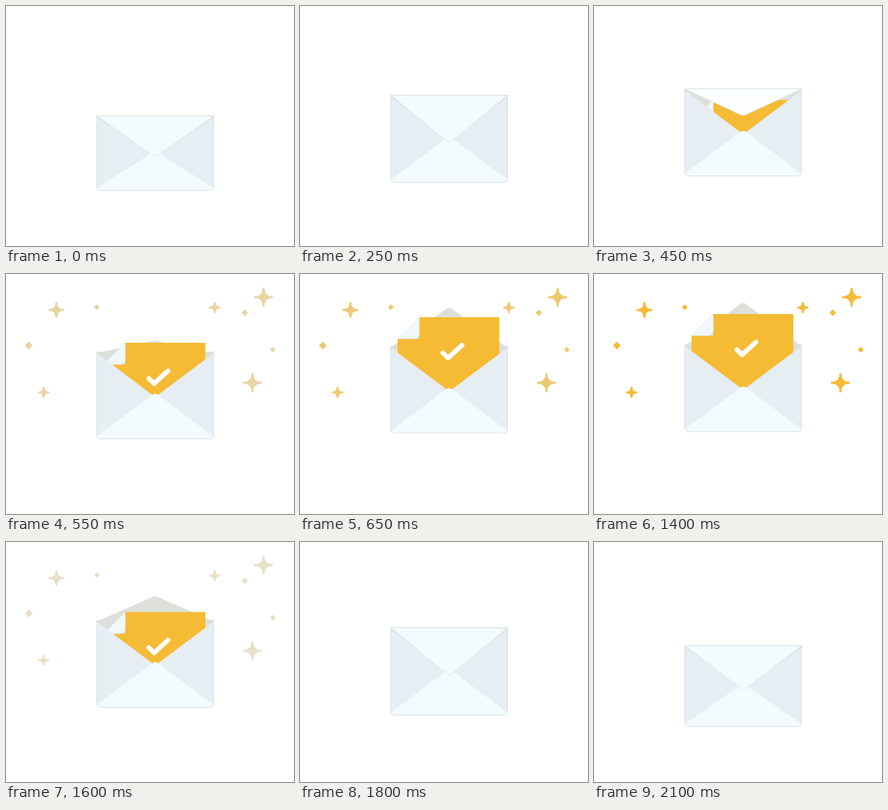
Write an HTML page with a canvas that moves like this. It is 360 px wide and 300 px high and loops after 2.2 s.

```html
<!DOCTYPE html>
<html lang="en">
<head>
<meta charset="utf-8">
<title>Envelope</title>
<style>
html, body { margin: 0; width: 100%; height: 100%; overflow: hidden; background: #fff; }
canvas { display: block; width: 360px; height: 300px; }
</style>
</head>
<body>
<canvas id="stage" width="360" height="300"></canvas>
<script>
const ctx = document.getElementById('stage').getContext('2d');
const LOOP = 2200, STEP = 50, LAST = 2100;
const L = 113.5, R = 259.5, CX = 186.5;
const GOLD = '#f5bb35', INSIDE = '#dddfdb', SIDE = '#e6edf3', PALE = '#f3fbfe', EDGE = '#d9e3e7';

// x, y, arm length
const stars = [
  [63, 45, 10], [113.5, 41.5, 3], [28.5, 89.5, 4.5], [47, 148, 7], [261, 42, 7],
  [298.5, 48.5, 3.5], [322, 29, 12], [333.5, 94.5, 3], [308, 136, 12]
];

const clamp = u => Math.max(0, Math.min(1, u));
const span = (t, a, b) => clamp((t - a) / (b - a));
const lerp = (a, b, u) => a + (b - a) * u;
const smooth = u => u * u * (3 - 2 * u);

function track(t, keys) {
  let i = 1;
  while (i < keys.length - 1 && t > keys[i][0]) i++;
  const [t0, v0] = keys[i - 1], [t1, v1] = keys[i];
  return lerp(v0, v1, span(t, t0, t1));
}

const bottomKeys = [[0, 230.5], [450, 212.5], [550, 206], [650, 199], [700, 197], [1400, 197], [2100, 230.5]];
const heightKeys = [[0, 93], [250, 109], [1900, 109], [2100, 101]];
const paperKeys = [[0, 22], [350, 22], [450, 14], [650, -36], [700, -38], [1400, -38], [1600, -10], [1800, 22]];

function poly(points, fill) {
  ctx.beginPath();
  points.forEach(([x, y]) => ctx.lineTo(x, y));
  ctx.closePath();
  ctx.fillStyle = fill;
  ctx.fill();
}

// Triangle on a horizontal base with a rounded tip
function wedge(base, tip, fill, edge) {
  ctx.beginPath();
  ctx.moveTo(L, base);
  ctx.arcTo(CX, tip + Math.sign(tip - base), R, base, 6);
  ctx.lineTo(R, base);
  ctx.closePath();
  ctx.fillStyle = fill;
  ctx.fill();
  if (edge) {
    ctx.strokeStyle = edge;
    ctx.lineWidth = 0.8;
    ctx.stroke();
  }
}

function bodyPath(top, bottom) {
  ctx.beginPath();
  ctx.roundRect(L, top, R - L, bottom - top, [1, 1, 5, 5]);
}

function drawPaper(top, bottom) {
  ctx.save();
  ctx.translate(0, top);
  poly([[149, 0], [249, 0], [249, bottom - top], [122, bottom - top], [122, 27], [149, 27]], GOLD);

  ctx.beginPath();
  ctx.moveTo(122, 27);
  ctx.lineTo(149, 0);
  ctx.arcTo(149, 27, 122, 27, 6);
  ctx.closePath();
  ctx.fillStyle = '#f0f8fc';
  ctx.fill();
  ctx.strokeStyle = '#dfebf0';
  ctx.lineWidth = 0.7;
  ctx.stroke();

  ctx.beginPath();
  ctx.moveTo(178.5, 44.5);
  ctx.lineTo(185, 51);
  ctx.lineTo(202.5, 35);
  ctx.strokeStyle = '#fff';
  ctx.lineWidth = 5.8;
  ctx.lineCap = ctx.lineJoin = 'round';
  ctx.stroke();
  ctx.restore();
}

function drawStar(x, y, r) {
  const a = r - 1.2, c = r > 5 ? 0 : r * 0.3;
  ctx.beginPath();
  ctx.moveTo(x, y - a);
  ctx.quadraticCurveTo(x + c, y - c, x + a, y);
  ctx.quadraticCurveTo(x + c, y + c, x, y + a);
  ctx.quadraticCurveTo(x - c, y + c, x - a, y);
  ctx.quadraticCurveTo(x - c, y - c, x, y - a);
  ctx.closePath();
  ctx.lineWidth = 2.6;
  ctx.lineJoin = 'round';
  ctx.fill();
  ctx.stroke();
}

function drawStars(glow) {
  if (glow <= 0) return;
  const mix = (a, b) => Math.round(lerp(a, b, glow));
  const color = `rgb(${mix(223, 245)},${mix(227, 187)},${mix(227, 53)})`;
  ctx.save();
  ctx.globalAlpha = clamp(glow * 4);
  ctx.fillStyle = ctx.strokeStyle = color;
  stars.forEach(s => drawStar(...s));
  ctx.restore();
}

function draw(t) {
  const bottom = track(t, bottomKeys), h = track(t, heightKeys), top = bottom - h;
  const open = t < 1400 ? smooth(span(t, 340, 690)) : 1 - span(t, 1400, 1800) ** 2.3;
  const tip = top + lerp(0.54 * h, -52, open);
  const glow = t < 1400 ? 1 - (1 - span(t, 450, 950)) ** 2 : 1 - span(t, 1400, 1650);

  ctx.fillStyle = '#fff';
  ctx.fillRect(0, 0, 360, 300);
  drawStars(glow);

  if (tip < top) wedge(top + 2, tip, INSIDE);
  bodyPath(top, bottom);
  ctx.fillStyle = INSIDE;
  ctx.fill();
  drawPaper(top + track(t, paperKeys), bottom - 8);

  ctx.save();
  bodyPath(top, bottom);
  ctx.clip();
  poly([[L, top + 2], [CX, top + 0.52 * h], [R, top + 2], [R, bottom], [L, bottom]], SIDE);
  wedge(bottom - 3, bottom - 0.52 * h, PALE);
  poly([[L, bottom - 3.5], [R, bottom - 3.5], [R, bottom], [L, bottom]], PALE);
  ctx.restore();

  if (tip >= top) {
    const turning = open > 0.05 && t < 1400;
    wedge(top, tip, turning ? '#fdfeff' : PALE, '#e0e8ec');
  }

  // Outline stays open along the mouth while the flap is up
  ctx.beginPath();
  ctx.moveTo(L, top);
  ctx.arcTo(L, bottom, CX, bottom, 5);
  ctx.arcTo(R, bottom, R, top, 5);
  ctx.lineTo(R, top);
  if (tip >= top) ctx.closePath();
  ctx.strokeStyle = EDGE;
  ctx.lineWidth = 1;
  ctx.stroke();
}

const start = performance.now();
function tick() {
  const t = (performance.now() - start) % LOOP;
  draw(Math.min(LAST, Math.floor(t / STEP) * STEP));
  requestAnimationFrame(tick);
}
tick();
</script>
</body>
</html>
```
